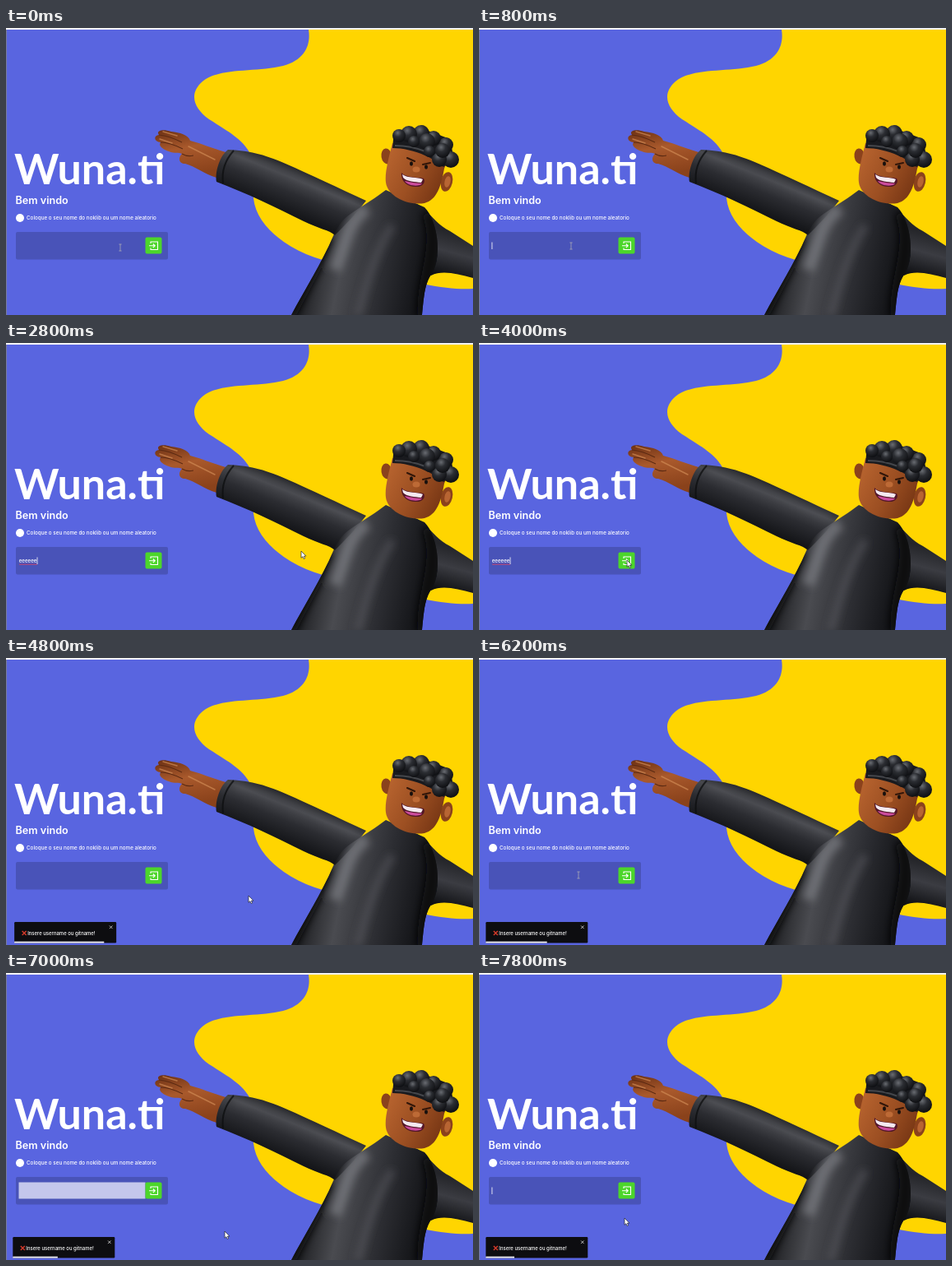
Animation of 568 by 349 pixels, one loop 8000 ms. Source, as an HTML page:

```html
<!DOCTYPE html>
<html lang="pt">
<head>
<meta charset="utf-8">
<style>
  html, body { margin: 0; width: 100%; height: 100%; overflow: hidden; background: #5965e0; }
  svg { display: block; width: 568px; height: 349px; }
  text { font-family: Inter, Roboto, sans-serif; fill: #fff; }
</style>
</head>
<body>
<svg viewBox="0 0 568 349">
  <defs>
    <linearGradient id="armTone" gradientUnits="userSpaceOnUse" x1="352" y1="165" x2="328" y2="224">
      <stop offset="0" stop-color="#191a1d"/><stop offset=".28" stop-color="#47484d"/>
      <stop offset=".55" stop-color="#2b2c31"/><stop offset="1" stop-color="#101114"/>
    </linearGradient>
    <linearGradient id="bodyTone" gradientUnits="userSpaceOnUse" x1="365" y1="260" x2="520" y2="290">
      <stop offset="0" stop-color="#18191c"/><stop offset=".3" stop-color="#4a4b50"/>
      <stop offset=".62" stop-color="#2c2d32"/><stop offset="1" stop-color="#0d0e11"/>
    </linearGradient>
    <linearGradient id="rightTone" gradientUnits="userSpaceOnUse" x1="550" y1="250" x2="536" y2="302">
      <stop offset="0" stop-color="#242529"/><stop offset=".45" stop-color="#3b3c42"/><stop offset="1" stop-color="#101114"/>
    </linearGradient>
    <linearGradient id="handTone" x1="0" y1="0" x2=".3" y2="1">
      <stop offset="0" stop-color="#6b3013"/><stop offset=".45" stop-color="#a9592c"/><stop offset="1" stop-color="#8a421b"/>
    </linearGradient>
    <linearGradient id="faceTone" x1="0" y1=".2" x2="1" y2=".7">
      <stop offset="0" stop-color="#b8642f"/><stop offset=".5" stop-color="#9c4f22"/><stop offset="1" stop-color="#713212"/>
    </linearGradient>
    <radialGradient id="curlTone" cx=".4" cy=".28" r=".75">
      <stop offset="0" stop-color="#696c72"/><stop offset=".4" stop-color="#2b2d32"/><stop offset="1" stop-color="#0c0d10"/>
    </radialGradient>
    <filter id="soft" x="-30%" y="-30%" width="160%" height="160%"><feGaussianBlur stdDeviation="5"/></filter>
    <clipPath id="torsoClip"><use href="#torso"/></clipPath>
  </defs>

  <rect width="568" height="349" fill="#5965e0"/>
  <path fill="#ffd500" d="M368 2C371 20 364 39 337 46C304 54 259 48 239 65C222 80 228 97 247 111C269 125 290 136 298 155C304 171 299 190 301 207C304 236 331 260 365 275C391 286 420 289 450 298C500 311 540 319 568 317V2Z"/>
  <path fill="#f3f3f6" d="M0 0H568V2H0Z"/>
  <path fill="#777b9c" d="M0 2H1V349H0Z"/>

  <!-- hand -->
  <path fill="url(#handTone)" d="M270 152C247 145 236 140 224 137C222 130 211 127 201 126C190 122 182 125 186 130C179 131 180 138 188 139C185 143 190 147 198 150C205 153 211 151 214 153C209 158 210 165 218 165C230 168 240 177 256 182Z"/>
  <path fill="none" stroke="#5c2a12" stroke-width="1.2" d="M186 130C197 131 206 135 214 139M188 139C197 139 207 143 215 147M214 153C219 156 224 156 228 155"/>
  <path fill="none" stroke="#d08a55" stroke-width="1.5" stroke-linecap="round" d="M191 126L208 131M187 135L202 140M222 144L254 160" opacity=".7"/>

  <!-- suit -->
  <path fill="url(#rightTone)" d="M500 214C519 227 523 239 540 247L568 265V304C548 299 531 294 517 301L480 290Z"/>
  <path id="torso" fill="url(#bodyTone)" d="M462 197C449 207 437 214 425 222C410 231 404 240 398 253C386 282 363 319 347 349H506C508 328 509 312 517 300C530 282 527 237 509 218Z"/>
  <path fill="url(#armTone)" d="M270 148C260 155 254 175 256 187C293 201 330 219 362 235C380 244 394 246 400 252C414 238 423 229 438 210C405 195 370 178 340 165C312 153 295 149 270 148Z"/>
  <g clip-path="url(#torsoClip)" fill="none" filter="url(#soft)">
    <path stroke="#77787e" stroke-width="15" d="M439 220C415 235 414 260 400 294" opacity=".8"/>
    <path stroke="#08090b" stroke-width="15" d="M513 225C530 265 505 305 508 350M395 254L345 349"/>
    <path stroke="#5d5e64" stroke-width="10" d="M470 240C450 270 438 310 428 350" opacity=".5"/>
  </g>
  <path fill="none" stroke="#7a7b82" stroke-width="3" stroke-linecap="round" opacity=".45" filter="url(#soft)" d="M280 156C325 161 365 187 425 213"/>
  <path fill="none" stroke="#0c0d0f" stroke-width="2" d="M277 149C267 160 262 174 264 189" opacity=".75"/>

  <!-- head -->
  <ellipse cx="463" cy="156" rx="6.5" ry="9.5" fill="#8b421c" transform="rotate(-9 463 156)"/>
  <ellipse cx="536" cy="187" rx="7" ry="12" fill="#8b421c" transform="rotate(13 536 187)"/>
  <ellipse cx="537" cy="187" rx="3.5" ry="7" fill="#b86533" transform="rotate(13 537 187)"/>
  <path fill="url(#faceTone)" d="M470 140C465 160 459 181 463 192C469 208 493 216 509 213C524 209 529 193 533 171L539 155Z"/>
  <path fill="#191a1e" d="M472 126L470 146C491 146 516 155 532 169L545 160L540 135L505 122Z"/>
  <path fill="none" stroke="#44464b" stroke-width="2" d="M473 143C496 143 515 150 532 163"/>
  <g id="curls" fill="url(#curlTone)"></g>
  <path fill="none" stroke="#321609" stroke-width="2" stroke-linecap="round" d="M488 158L497 162M507 166L516 164"/>
  <g fill="#17100d"><ellipse cx="493" cy="165" rx="2" ry="2.7"/><ellipse cx="511" cy="169" rx="2" ry="2.7"/></g>
  <ellipse cx="499" cy="172" rx="4.5" ry="3.5" fill="#bd6a36"/>
  <path fill="#521627" d="M481 176C486 182 498 181 508 183C511 188 506 194 498 193C488 193 480 187 481 176Z"/>
  <path fill="#f4e9ef" d="M482 178C489 183 500 181 507 184L505 188C497 187 488 187 483 182Z"/>
  <path fill="#cc4c9d" d="M485 186C493 188 500 189 506 189C504 193 489 193 485 186Z"/>

  <!-- form -->
  <text x="10" y="190" font-size="52" font-weight="700" style="font-family: Lato, sans-serif">Wuna.ti</text>
  <text x="11.5" y="214" font-size="12.6" font-weight="600">Bem vindo</text>
  <circle cx="17" cy="231" r="5" fill="#fff"/>
  <text x="25" y="233.2" font-size="6.3" font-weight="500">Coloque o seu nome do noklib ou um nome aleatorio</text>
  <rect x="12" y="248" width="185" height="33.5" rx="2" fill="#4953b8"/>
  <rect id="fill" x="15.5" y="254.5" width="154" height="20" fill="#c4c7ec"/>
  <rect x="169.5" y="254.5" width="20" height="20" rx="2" fill="#4cd62b"/>
  <path fill="none" stroke="#fff" stroke-width="1.1" d="M176 262V260H184.5V269.5H176V267.5M174 264.8H181M178.8 262.5L181.2 264.8L178.8 267.1"/>
  <text id="typed" x="15.7" y="267" font-size="6.2" font-weight="500"></text>
  <path id="squiggle" fill="none" stroke="#e2405c" stroke-width=".8" d="M16 269.2H38"/>
  <rect id="caret" y="260.5" width=".8" height="8.5" fill="#fff"/>

  <!-- toast -->
  <g id="toast">
    <rect width="124" height="25.5" rx="1.2" fill="#0d0d10"/>
    <path stroke="#d63a2a" stroke-width="1.4" d="M9.5 11L14.5 16M14.5 11L9.5 16"/>
    <text x="16" y="15.5" font-size="5.95" font-weight="500">Insere username ou gitname!</text>
    <path stroke="#ddd" stroke-width=".8" d="M115.7 4.5L119.3 8.1M119.3 4.5L115.7 8.1"/>
    <rect id="bar" y="23.7" height="1.9" fill="#e9e9ef"/>
  </g>

  <path id="arrow" fill="#fff" stroke="#22232d" stroke-width=".7" d="M0 0V8.3L1.9 6.7L3.2 9.5L4.6 8.9L3.4 6.1H5.9Z"/>
  <path id="beam" fill="none" stroke="#a9a9b5" stroke-width=".8" d="M-1.6 -4H1.6M0 -4V4M-1.6 4H1.6"/>
</svg>
<script>
const LOOP = 8000, STEP = 200, TOAST_START = 4200, TOAST_LIFE = 5000;
const $ = id => document.getElementById(id);
const show = (id, on) => $(id).setAttribute('visibility', on ? 'visible' : 'hidden');
const place = (id, x, y) => $(id).setAttribute('transform', `translate(${x} ${y})`);

// [x, y, radius] of each hair ball
const curls = [[535, 142, 9], [520, 134, 9], [505, 128, 10], [490, 129, 10], [478, 131, 8],
  [541, 160, 10], [527, 160, 9], [512, 138, 10], [496, 138, 7], [531, 149, 9], [515, 150, 7]];
$('curls').innerHTML = curls.map(([x, y, r]) => `<circle cx="${x}" cy="${y}" r="${r}"/>`).join('');

// [time, x, y] of the pointer
const pointer = [[0, 139, 267], [400, 112, 265], [800, 112, 265], [1200, 170, 299], [1600, 176, 304],
  [2200, 176, 304], [2800, 359, 253], [3400, 300, 262], [4000, 180, 264], [4200, 180, 264], [4800, 295, 289],
  [5200, 400, 296], [5600, 270, 285], [6000, 125, 264], [6200, 121, 264], [6600, 150, 285],
  [7000, 266, 314], [7200, 273, 314], [7800, 177, 298], [8000, 177, 298]];

// [progress, offset] of the bounce as the toast enters
const bounce = [[0, -1170], [.6, 9.8], [.75, -3.9], [.9, 2], [1, 0]];

const easeOut = u => 1 - (1 - u) ** 3;
const smooth = u => u * u * (3 - 2 * u);

function sample(keys, at, ease) {
  if (at >= keys.at(-1)[0]) return keys.at(-1).slice(1);
  const i = keys.findIndex(k => k[0] > at), a = keys[i - 1], b = keys[i];
  const u = ease((at - a[0]) / (b[0] - a[0]));
  return a.slice(1).map((v, j) => v + (b[j + 1] - v) * u);
}

function draw(t) {
  const count = t >= TOAST_START || t < 1200 ? 0 : Math.min(6, 1 + (t - 1200) / 80 | 0);
  $('typed').textContent = 'e'.repeat(count);
  show('squiggle', t >= 2600 && count > 0);
  show('fill', t >= 6600 && t < 7400);

  const focused = t >= 600 && t < TOAST_START || t >= 7400;
  show('caret', focused && (t + 400) % 1000 < 600);
  $('caret').setAttribute('x', 15.5 + (count ? $('typed').getComputedTextLength() + .3 : 0));

  const age = t - TOAST_START;
  show('toast', age >= 0);
  if (age >= 0) {
    const [offset] = sample(bounce, age / 700, easeOut);
    place('toast', 8.3 + offset, 321);
    $('toast').setAttribute('opacity', Math.min(1, easeOut(Math.min(1, age / 420))));
    $('bar').setAttribute('width', 124 * (1 - age / TOAST_LIFE));
  }

  const [x, y] = sample(pointer, t, smooth);
  const inField = x > 12 && x < 168 && y > 248 && y < 281;
  show('beam', inField);
  show('arrow', !inField);
  place(inField ? 'beam' : 'arrow', x, y);
}

const start = performance.now();
function tick() {
  const t = (performance.now() - start) % LOOP;
  draw(Math.floor(t / STEP) * STEP);
  requestAnimationFrame(tick);
}
tick();
</script>
</body>
</html>
```
